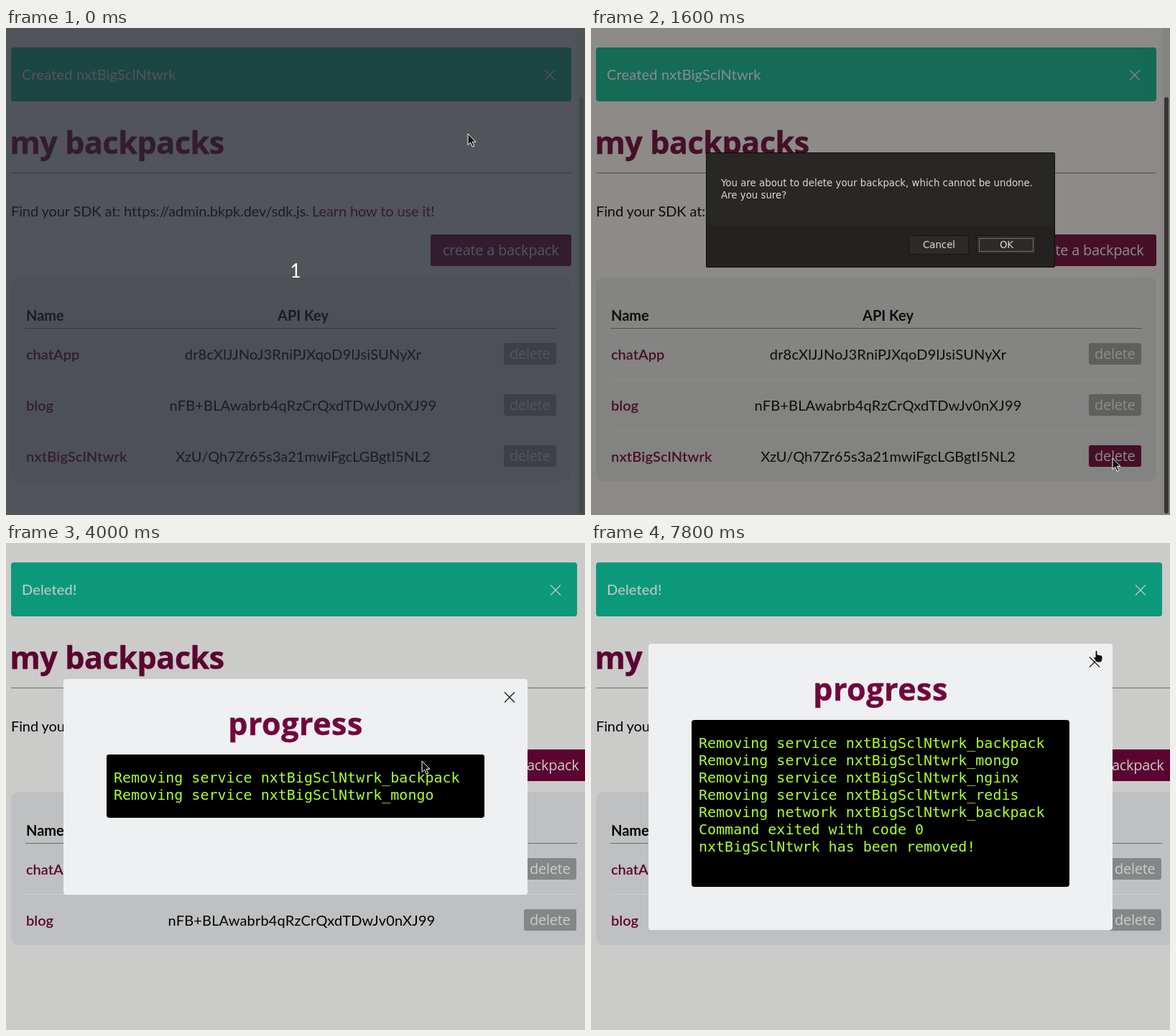
An HTML page that plays this animation: 806 by 677 pixels, repeating every 8 s.

```html
<!DOCTYPE html>
<html lang="en">
<head>
<meta charset="utf-8">
<title>Deleting a backpack</title>
<style>
  html, body { margin: 0; width: 100%; height: 100%; overflow: hidden; background: #fefefd; }
  svg { display: block; width: 806px; height: 677px; }
  text { font: 20px Lato, sans-serif; white-space: pre; }
  .b { font-weight: 700; }
  .semi { font-weight: 600; }
  .wide { letter-spacing: .17px; }
  .tight { letter-spacing: -.11px; }
  .mid { text-anchor: middle; }
  .wine { fill: #72063c; }
  .head { font: 700 43px "Open Sans", sans-serif; fill: #72063c; stroke: #72063c; stroke-width: .5px; }
  .h1 { letter-spacing: -.4px; }
  .h2 { letter-spacing: .5px; }
  .btn { font: 20px "Open Sans", sans-serif; letter-spacing: -.28px; fill: #fff; }
  .sys { font: 13.333px "DejaVu Sans", sans-serif; fill: #dcdad6; }
  .term { font: 20px "DejaVu Sans Mono", monospace; fill: #adff2f; }
  .rule { stroke: #868a8b; }
  .row { stroke: #fff; }
  .line { fill: none; stroke-width: 1.1; }

  /* one loop is 8 s, so 1% is 80 ms */
  .k { animation: 8s step-end infinite; }
  .count { animation-name: count; }
  .before { animation-name: before; }
  .after { animation-name: after; }
  .hover { animation-name: hover; }
  .focus { animation-name: focus; }
  .thumb { animation-name: thumb; }
  .confirm { animation-name: confirm; }
  .empty { animation-name: empty; }
  .short { animation-name: short; }
  .full { animation-name: full; }
  .arrow { animation-name: move, arrow; }
  .hand { animation-name: hand, point; }

  @keyframes count { 0% { opacity: 1 } 2.5%, 100% { opacity: 0 } }
  @keyframes before { 0% { opacity: 1 } 46.25%, 100% { opacity: 0 } }
  @keyframes after { 0% { opacity: 0 } 46.25%, 100% { opacity: 1 } }
  @keyframes hover { 0% { opacity: 0 } 15%, 100% { opacity: 1 } }
  @keyframes focus { 0%, 20% { opacity: 0 } 17.5%, 43.75%, 100% { opacity: 1 } }
  @keyframes thumb { 0% { fill: #c9c9c9 } 17.5%, 100% { fill: #555 } }
  @keyframes confirm { 0% { opacity: 0 } 20% { opacity: 1 } 43.75%, 100% { opacity: 0 } }
  @keyframes empty { 0% { opacity: 0 } 46.25% { opacity: 1 } 55%, 100% { opacity: 0 } }
  @keyframes short { 0% { opacity: 0 } 50% { opacity: 1 } 55%, 100% { opacity: 0 } }
  @keyframes full { 0% { opacity: 0 } 55%, 100% { opacity: 1 } }
  @keyframes arrow { 0% { opacity: 1 } 95%, 100% { opacity: 0 } }
  @keyframes point { 0% { opacity: 0 } 95%, 100% { opacity: 1 } }
  @keyframes hand { 0% { transform: translate(702px, 148px) } 97.5%, 100% { transform: translate(699px, 149px) } }
  @keyframes move {
    0% { transform: translate(643px, 147px) }
    6.25% { transform: translate(644px, 156px) }
    7.5% { transform: translate(651px, 190px) }
    8.75% { transform: translate(663px, 255px) }
    10% { transform: translate(677px, 345px) }
    11.25% { transform: translate(694px, 430px) }
    12.5% { transform: translate(708px, 505px) }
    13.75% { transform: translate(718px, 560px) }
    15% { transform: translate(724px, 590px) }
    16.25% { transform: translate(726px, 598px) }
    32.5% { transform: translate(721px, 588px) }
    33.75% { transform: translate(703px, 550px) }
    35% { transform: translate(671px, 487px) }
    36.25% { transform: translate(636px, 420px) }
    37.5% { transform: translate(603px, 355px) }
    38.75% { transform: translate(580px, 312px) }
    40% { transform: translate(566px, 291px) }
    41.25% { transform: translate(579px, 303px) }
    61.25% { transform: translate(596px, 297px) }
    62.5% { transform: translate(632px, 281px) }
    63.75% { transform: translate(664px, 265px) }
    66.25% { transform: translate(685px, 235px) }
    68.75% { transform: translate(688px, 220px) }
    70% { transform: translate(690px, 197px) }
    72.5% { transform: translate(693px, 185px) }
    73.75% { transform: translate(699px, 165px) }
    75%, 100% { transform: translate(704px, 147px) }
  }
</style>
</head>
<body>
<svg viewBox="0 0 806 677">
  <defs>
    <path id="x" class="line" d="M-7-7 7 7M7-7-7 7"/>
    <g id="delete">
      <rect width="73" height="30" rx="3" fill="currentColor"/>
      <text class="btn" x="8" y="22">delete</text>
    </g>
    <g id="create">
      <rect width="196" height="44" rx="3" class="wine"/>
      <text class="btn" x="17" y="29">create a backpack</text>
    </g>
    <g id="intro">
      <text class="head h1" x="5.5" y="175">my backpacks</text>
      <text class="tight" x="7" y="262">Find your SDK at: https://admin.bkpk.dev/sdk.js.</text>
      <text class="wine tight" x="426" y="262">Learn how to use it!</text>
    </g>
    <g id="names">
      <text class="b" x="28" y="407">Name</text>
      <text class="semi wine" x="28" y="461">chatApp</text>
      <text class="semi wine" x="28" y="532">blog</text>
    </g>
    <g id="keys">
      <text class="b mid" x="413.5" y="407">API Key</text>
      <text class="mid wide" x="413.5" y="461">dr8cXlJJNoJ3RniPJXqoD9lJsiSUNyXr</text>
      <text class="mid wide" x="413.5" y="532">nFB+BLAwabrb4qRzCrQxdTDwJv0nXJ99</text>
    </g>
    <g id="two">
      <text class="term" x="150" y="39">Removing service nxtBigSclNtwrk_backpack</text>
      <text class="term" x="150" y="63">Removing service nxtBigSclNtwrk_mongo</text>
    </g>
  </defs>

  <rect width="806" height="677" fill="#fefefd"/>

  <!-- list with three backpacks -->
  <g class="k before">
    <rect x="795" width="11" height="677" fill="#f2f2f2"/>
    <rect class="k thumb" x="798" y="96" width="6" height="579" rx="3"/>
    <rect x="7" y="27" width="780" height="75" rx="4" fill="#0fbf98"/>
    <text class="wide" x="22" y="72" fill="#fff">Created nxtBigSclNtwrk</text>
    <use href="#x" x="757" y="65.5" stroke="#fff"/>
    <use href="#intro"/>
    <path class="rule" d="M7 201.5H787"/>
    <use href="#create" x="591" y="287"/>
    <rect x="7" y="346" width="780" height="284" rx="10" fill="#eef0f2"/>
    <path class="rule" d="M27 417.5H767"/>
    <path class="row" d="M27 488.5H767M27 559.5H767"/>
    <use href="#names"/>
    <use href="#keys"/>
    <text class="semi wine wide" x="28" y="603">nxtBigSclNtwrk</text>
    <text class="mid" x="413.5" y="603">XzU/Qh7Zr65s3a21mwiFgcLGBgtI5NL2</text>
    <g color="#a3a9a9">
      <use href="#delete" x="693" y="438"/>
      <use href="#delete" x="693" y="509"/>
      <use href="#delete" x="693" y="580"/>
    </g>
    <g class="k hover" color="#72063c"><use href="#delete" x="693" y="580"/></g>
    <rect class="k focus" x="699.5" y="583.5" width="60" height="23" fill="none" stroke="#fff" stroke-dasharray="1 1"/>
  </g>

  <!-- confirm box -->
  <g class="k confirm">
    <rect width="806" height="677" fill="rgba(26,24,20,.5)"/>
    <rect x="160.5" y="173.5" width="485" height="159" rx="1" fill="#282724" stroke="#0c0c0b"/>
    <rect x="161" y="274" width="484" height="58" fill="#232220"/>
    <text class="sys" x="181" y="220">You are about to delete your backpack, which cannot be undone.</text>
    <text class="sys" x="181" y="237">Are you sure?</text>
    <g fill="#2c2b29" stroke="#171615">
      <rect x="442.5" y="288.5" width="83" height="26" rx="2"/>
      <rect x="536.5" y="288.5" width="83" height="26" rx="2"/>
    </g>
    <rect x="540.5" y="292.5" width="75" height="18" fill="none" stroke="#b5b3af" stroke-dasharray="1 1"/>
    <text class="sys mid" x="484.5" y="306">Cancel</text>
    <text class="sys mid" x="578.5" y="306">OK</text>
  </g>

  <!-- list with two backpacks, progress on top -->
  <g class="k after">
    <rect x="7" y="27" width="788" height="75" rx="4" fill="#0fbf98"/>
    <text class="wide" x="22" y="72" fill="#fff">Deleted!</text>
    <use href="#x" x="765" y="65.5" stroke="#fff"/>
    <use href="#intro"/>
    <path class="rule" d="M7 201.5H806"/>
    <use href="#create" x="619" y="287"/>
    <rect x="7" y="346" width="816" height="213" rx="10" fill="#eef0f2"/>
    <path class="rule" d="M27 417.5H795"/>
    <path class="row" d="M27 488.5H795"/>
    <use href="#names"/>
    <use href="#keys" x="-2"/>
    <g color="#a3a9a9">
      <use href="#delete" x="721" y="438"/>
      <use href="#delete" x="721" y="509"/>
    </g>
    <rect width="806" height="677" fill="rgba(0,0,0,.2)"/>
  </g>
  <g class="k empty">
    <rect x="80" y="189" width="646" height="300" rx="4" fill="#eef0f2"/>
    <use href="#x" x="701" y="214.5" stroke="#111"/>
    <text class="head h2 mid" x="403" y="267">progress</text>
    <rect x="140" y="294" width="526" height="40" rx="4"/>
  </g>
  <g class="k short">
    <rect x="140" y="294" width="526" height="88" rx="4"/>
    <use href="#two" y="294"/>
  </g>
  <g class="k full">
    <rect x="80" y="140" width="646" height="398" rx="4" fill="#eef0f2"/>
    <use href="#x" x="701" y="165.5" stroke="#111"/>
    <text class="head h2 mid" x="403" y="219">progress</text>
    <rect x="140" y="246" width="526" height="232" rx="4"/>
    <use href="#two" y="246"/>
    <text class="term" x="150" y="333">Removing service nxtBigSclNtwrk_nginx</text>
    <text class="term" x="150" y="357">Removing service nxtBigSclNtwrk_redis</text>
    <text class="term" x="150" y="381">Removing network nxtBigSclNtwrk_backpack</text>
    <text class="term" x="150" y="405">Command exited with code 0</text>
    <text class="term" x="150" y="429">nxtBigSclNtwrk has been removed!</text>
  </g>

  <!-- countdown -->
  <g class="k count">
    <rect width="806" height="677" fill="rgba(33,37,43,.78)"/>
    <text class="mid" x="403" y="347" fill="#fff" style="font-size:26px">1</text>
  </g>

  <!-- pointer -->
  <g fill="#111" stroke="#fff" stroke-linejoin="round">
    <path class="k arrow" d="M0 0V15.5L3.6 12.2 6.2 18.2 8.8 17.1 6.3 11.3H11Z"/>
    <path class="k hand" d="M3 1.5Q4.5-.5 6 1.5V6L11.5 7.2Q13 7.6 13 9V13L11.5 17H5L1 11.5Q-.5 9.3 1.2 9L3 10Z"/>
  </g>
</svg>
</body>
</html>
```
